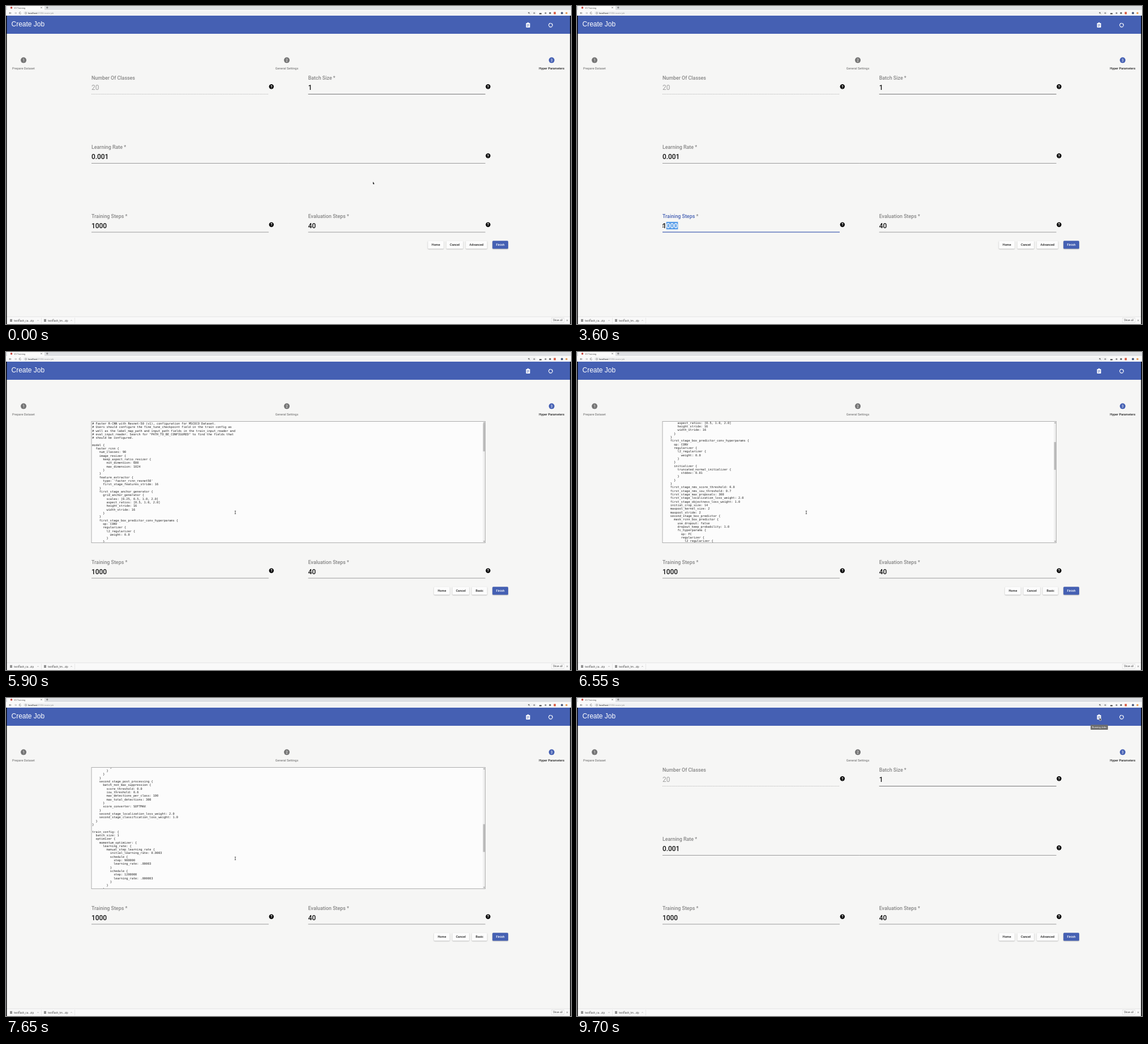
Recreate the animation shown at these times as an HTML page with a canvas. Size 998 by 561 pixels, loop 9750 ms.

```html
<!DOCTYPE html>
<html lang="en">
<head>
<meta charset="utf-8">
<title>Create Job</title>
<style>
html, body { margin: 0; width: 100%; height: 100%; overflow: hidden; background: #f6f6f5; }
canvas { display: block; }
</style>
</head>
<body>
<canvas id="stage" width="998" height="561"></canvas>
<script>
const ctx = document.getElementById('stage').getContext('2d');
const LOOP = 9750;
const BLUE = '#4560b3', PAGE = '#f6f6f5';
const ROBOTO = 'Roboto, sans-serif', ARIAL = '"Liberation Sans", sans-serif';
const MONO = '"DejaVu Sans Mono", monospace';
const LINE = 6.32;
const ADVANCED_FROM = 5350, ADVANCED_TO = 8950;

const config = `# Faster R-CNN with Resnet-50 (v1), configuration for MSCOCO Dataset.
# Users should configure the fine_tune_checkpoint field in the train config as
# well as the label_map_path and input_path fields in the train_input_reader and
# eval_input_reader. Search for "PATH_TO_BE_CONFIGURED" to find the fields that
# should be configured.

model {
  faster_rcnn {
    num_classes: 90
    image_resizer {
      keep_aspect_ratio_resizer {
        min_dimension: 600
        max_dimension: 1024
      }
    }
    feature_extractor {
      type: 'faster_rcnn_resnet50'
      first_stage_features_stride: 16
    }
    first_stage_anchor_generator {
      grid_anchor_generator {
        scales: [0.25, 0.5, 1.0, 2.0]
        aspect_ratios: [0.5, 1.0, 2.0]
        height_stride: 16
        width_stride: 16
      }
    }
    first_stage_box_predictor_conv_hyperparams {
      op: CONV
      regularizer {
        l2_regularizer {
          weight: 0.0
        }
      }
      initializer {
        truncated_normal_initializer {
          stddev: 0.01
        }
      }
    }
    first_stage_nms_score_threshold: 0.0
    first_stage_nms_iou_threshold: 0.7
    first_stage_max_proposals: 300
    first_stage_localization_loss_weight: 2.0
    first_stage_objectness_loss_weight: 1.0
    initial_crop_size: 14
    maxpool_kernel_size: 2
    maxpool_stride: 2
    second_stage_box_predictor {
      mask_rcnn_box_predictor {
        use_dropout: false
        dropout_keep_probability: 1.0
        fc_hyperparams {
          op: FC
          regularizer {
            l2_regularizer {
              weight: 0.0
            }
          }
          initializer {
            variance_scaling_initializer {
              factor: 1.0
              uniform: true
              mode: FAN_AVG
            }
          }
        }
      }
    }
    second_stage_post_processing {
      batch_non_max_suppression {
        score_threshold: 0.0
        iou_threshold: 0.6
        max_detections_per_class: 100
        max_total_detections: 300
      }
      score_converter: SOFTMAX
    }
    second_stage_localization_loss_weight: 2.0
    second_stage_classification_loss_weight: 1.0
  }
}

train_config: {
  batch_size: 1
  optimizer {
    momentum_optimizer: {
      learning_rate: {
        manual_step_learning_rate {
          initial_learning_rate: 0.0003
          schedule {
            step: 900000
            learning_rate: .00003
          }
          schedule {
            step: 1200000
            learning_rate: .000003
          }
        }
      }
      momentum_optimizer_value: 0.9
    }
    use_moving_average: false
  }
  gradient_clipping_by_norm: 10.0
  fine_tune_checkpoint: "/weights/frcnn_resnet_50/model.ckpt"
  from_detection_checkpoint: true
  # Note: The below line limits the training process to 200K steps, which we
  # empirically found to be sufficient enough to train the pets dataset. This
  # effectively bypasses the learning rate schedule (the learning rate will
  # never decay). Remove the below line to train indefinitely.
  num_steps: 200000
  data_augmentation_options {
    random_horizontal_flip {
    }
  }
}

train_input_reader: {
  tf_record_input_reader {
    input_path: "/training_dir/data/train.record"
  }
  label_map_path: "/training_dir/data/object-detection.pbtxt"
}

eval_config: {
  num_examples: 8000
  # Note: The below line limits the evaluation process to 10 evaluations.
  # Remove the below line to evaluate indefinitely.
  max_evals: 10
}

eval_input_reader: {
  tf_record_input_reader {
    input_path: "/training_dir/data/test.record"
  }
  label_map_path: "/training_dir/data/object-detection.pbtxt"
  shuffle: false
  num_readers: 1
}`.split('\n');

// Keyframes: [time, ...values]
const scrollKeys = [[5980, 0], [6550, 140], [7650, 414.6], [8250, 598.4], [8420, 650]];
const pointerKeys = [
  [0, 649, 312], [150, 649, 312], [950, 184, 158], [1500, 184, 158], [2100, 285, 250],
  [2600, 285, 250], [3150, 181, 388], [3300, 181, 388], [3600, 152, 388], [4300, 152, 388],
  [4800, 515, 403], [4980, 515, 403], [5280, 831, 422], [5400, 831, 422], [5800, 405, 283],
  [8480, 405, 283], [8880, 837, 422], [9000, 837, 422], [9500, 924, 37]
];

function sample(keys, t, ease = k => k) {
  if (t <= keys[0][0]) return keys[0].slice(1);
  for (let i = 1; i < keys.length; i++) {
    const [a, b] = [keys[i - 1], keys[i]];
    if (t < b[0]) {
      const k = ease((t - a[0]) / (b[0] - a[0]));
      return a.slice(1).map((v, j) => v + (b[j + 1] - v) * k);
    }
  }
  return keys[keys.length - 1].slice(1);
}
const smooth = k => k * k * (3 - 2 * k);

function rect(x, y, w, h, color) {
  ctx.fillStyle = color;
  ctx.fillRect(x, y, w, h);
}
function round(x, y, w, h, r, color) {
  ctx.fillStyle = color;
  ctx.beginPath();
  ctx.roundRect(x, y, w, h, r);
  ctx.fill();
}
function disc(x, y, r, color) {
  ctx.fillStyle = color;
  ctx.beginPath();
  ctx.arc(x, y, r, 0, 7);
  ctx.fill();
}
function text(str, x, y, size, color, { family = ROBOTO, weight = 400, align = 'left' } = {}) {
  ctx.font = `${weight} ${size}px ${family}`;
  ctx.textAlign = align;
  ctx.fillStyle = color;
  ctx.fillText(str, x, y);
}
function path(points, color, width = 0.7, dash = []) {
  ctx.beginPath();
  points.forEach(([x, y]) => ctx.lineTo(x, y));
  ctx.strokeStyle = color;
  ctx.lineWidth = width;
  ctx.setLineDash(dash);
  ctx.stroke();
  ctx.setLineDash([]);
}
function cross(x, y, r, color) {
  path([[x - r, y - r], [x + r, y + r]], color);
  path([[x + r, y - r], [x - r, y + r]], color);
}

function browserBars() {
  rect(0, 0, 998, 7, '#dee0e3');
  rect(2, 0, 66, 7, '#fafafa');
  disc(9.5, 3, 1.8, '#c33c35');
  text('V3 Training', 14, 4.6, 4, '#555');
  cross(62.5, 2.8, 1.1, '#555');
  path([[71, 2.8], [74.6, 2.8]], '#555');
  path([[72.8, 1], [72.8, 4.6]], '#555');

  rect(0, 7, 998, 10, '#fafafa');
  path([[9.5, 12.4], [5.8, 12.4], [7.4, 10.8]], '#555');
  path([[5.8, 12.4], [7.4, 14]], '#555');
  path([[15, 12.4], [18.6, 12.4], [17, 10.8]], '#aaa');
  path([[18.6, 12.4], [17, 14]], '#aaa');
  ctx.beginPath();
  ctx.arc(25, 12.4, 1.7, 0.4, 5.6);
  ctx.strokeStyle = '#555';
  ctx.stroke();
  round(30, 8.8, 907, 7.2, 3.6, '#f1f2f3');
  ctx.beginPath();
  ctx.arc(35, 12.5, 1.5, 0, 7);
  ctx.lineWidth = 0.5;
  ctx.stroke();
  text('localhost', 39, 13.9, 4, '#222');
  text(':3100/create-job', 55, 13.9, 4, '#999');
  disc(923.5, 12, 1.3, '#777');
  path([[924, 12.6], [925.6, 14.4]], '#777');
  disc(933, 12.5, 1.5, '#999');
  rect(942, 12.5, 4, 2, '#444');
  disc(953, 12.5, 1.6, '#888');
  disc(961, 12.5, 1.7, '#666');
  rect(967.5, 10.5, 3.6, 4, '#d8573d');
  disc(982, 12.5, 2, '#475779');
  disc(990, 12.5, 1.8, '#e49a52');
}

function header() {
  rect(0, 17, 998, 32, BLUE);
  text('Create Job', 9.5, 36.4, 12, '#fff', { family: ARIAL });
  round(918.6, 30, 7, 8, 0.8, '#fff');
  disc(922.1, 30, 1.2, '#fff');
  for (const [y, w] of [[32.2, 4], [33.9, 4], [35.6, 2.7]]) rect(920.1, y, w, 0.7, BLUE);
  ctx.strokeStyle = '#fff';
  ctx.lineWidth = 1.3;
  for (let i = 0; i < 3; i++) {
    ctx.beginPath();
    ctx.arc(962, 33.8, 3.3, i * 2.094 - 1.4, i * 2.094 + 0.5);
    ctx.stroke();
  }
}

function step(n, x, label, active) {
  disc(x, 95.6, 5, active ? BLUE : '#757575');
  text(n, x, 97.9, 6.4, '#fff', { align: 'center' });
  text(label, x, 111.6, 5.57, active ? '#222' : '#666', { align: 'center', weight: active ? 500 : 400 });
}

function help(x, y) {
  disc(x, y, 4.2, '#080808');
  text('?', x, y + 2.4, 6.6, '#fff', { align: 'center', weight: 700 });
}

function field(label, value, x, y, right, { line = '#9b9b9b', disabled, focused } = {}) {
  const star = label.endsWith(' *');
  const name = star ? label.slice(0, -2) : label;
  text(name, x, y + 3.2, 8.9, focused ? BLUE : '#858585', { weight: 500 });
  if (star) text(' *', x + ctx.measureText(name).width, y + 3.2, 8.9, '#858585', { weight: 500 });
  text(value, x, y + 21.2, 11.9, disabled ? '#a0a0a0' : '#111', { weight: disabled ? 400 : 500 });
  const lineY = y + 28.5;
  if (disabled) path([[x, lineY], [right, lineY]], '#b5b5b5', 0.9, [1.5, 1.2]);
  else if (focused) path([[x, lineY - 0.2], [right, lineY - 0.2]], BLUE, 1.3);
  else path([[x, lineY], [right, lineY]], line, 1);
  help(right + 4.8, y + 15.2);
}

function button(label, x, w, primary) {
  ctx.save();
  ctx.shadowColor = 'rgba(0,0,0,.3)';
  ctx.shadowBlur = 2;
  ctx.shadowOffsetY = 0.8;
  round(x, 414.3, w, 14, 1.5, primary ? BLUE : '#fcfcfc');
  ctx.restore();
  text(label, x + w / 2, 423.2, 5.6, primary ? '#fff' : '#222', { align: 'center', weight: 500 });
}

function selection(t) {
  if (t < 3330 || t > 4780) return;
  const digit = 6.76;
  const count = t > 3630 ? 4 : Math.min(3, 1 + Math.floor((t - 3330) / 90));
  const x = 151 + (4 - count) * digit;
  rect(x, 380.8, count * digit + 0.3, 13.2, '#559be8');
  text('0'.repeat(count).replace(/^0000$/, '1000'), x, 391.7, 11.9, '#fff', { weight: 500 });
}

function editor(t) {
  const [scroll] = sample(scrollKeys, t);
  rect(151, 122.5, 696, 214, '#fcfcfc');
  ctx.save();
  ctx.beginPath();
  ctx.rect(151, 123, 691, 213);
  ctx.clip();
  config.forEach((row, i) => {
    const y = 127.9 + i * LINE - scroll;
    if (y > 118 && y < 344) text(row, 152.2, y, 5.265, '#222', { family: MONO });
  });
  ctx.restore();
  rect(842.3, 123, 4.2, 213, '#f0f0f0');
  rect(842.6, 126.3 + scroll * 0.232, 3.6, 49, '#bdbdbd');
  for (const [y, d] of [[125, -1], [334, 1]]) {
    ctx.fillStyle = '#666';
    ctx.beginPath();
    ctx.moveTo(843.2, y - d * 0.6);
    ctx.lineTo(845.8, y - d * 0.6);
    ctx.lineTo(844.5, y + d * 0.9);
    ctx.fill();
  }
  ctx.strokeStyle = '#adadad';
  ctx.lineWidth = 1;
  ctx.strokeRect(151, 122.5, 695.5, 214);
}

function downloads() {
  rect(0, 548, 998, 13, '#f9f9f9');
  rect(0, 547.8, 998, 0.7, '#dcdcdc');
  [['testflash_ca...zip', 7], ['testflash_tm...zip', 67]].forEach(([name, x], i) => {
    rect(x, 552.6, 4, 4.2, '#777');
    rect(x, 554.4, 4, 0.6, '#ddd');
    text(name, x + 7, 556.5, 4.7, '#555');
    const c = i ? 115.5 : 56.5;
    path([[c - 1.2, 555.4], [c, 554.2], [c + 1.2, 555.4]], '#777', 0.6);
    rect(c + 5.5, 550, 0.6, 10, '#ddd');
  });
  round(963, 550.2, 23, 8.3, 1, '#ccc');
  round(963.5, 550.7, 22, 7.3, 0.8, '#fff');
  text('Show all', 974.5, 556, 4.5, '#444', { align: 'center' });
  cross(991.3, 554.6, 1.1, '#666');
}

function pointer(t) {
  const [x, y] = sample(pointerKeys, t, smooth);
  const inText = (t > 3130 && t < 4320) || (t > 5720 && t < 8520);
  if (inText) {
    path([[x - 1.2, y - 2.5], [x + 1.2, y - 2.5]], '#333', 0.7);
    path([[x, y - 2.5], [x, y + 2.5]], '#333', 0.8);
    path([[x - 1.2, y + 2.5], [x + 1.2, y + 2.5]], '#333', 0.7);
    return;
  }
  ctx.beginPath();
  for (const [dx, dy] of [[-1, -2], [-1, 2.6], [0, 1.8], [0.7, 3], [1.4, 2.6], [0.9, 1.4], [2, 1.3]])
    ctx.lineTo(x + dx, y + dy);
  ctx.closePath();
  ctx.strokeStyle = '#fff';
  ctx.lineWidth = 1;
  ctx.stroke();
  ctx.fillStyle = '#333';
  ctx.fill();
}

function draw(t) {
  const advanced = t >= ADVANCED_FROM && t < ADVANCED_TO;
  rect(0, 0, 998, 561, PAGE);
  browserBars();
  header();
  step('1', 31, 'Prepare Dataset');
  step('2', 496, 'General Settings');
  step('3', 963.8, 'Hyper Parameters', true);

  if (advanced) {
    editor(t);
  } else {
    field('Number Of Classes', '20', 151, 127, 464, { disabled: true });
    field('Batch Size *', '1', 533.7, 127, 846.7, { line: '#777' });
    field('Learning Rate *', '0.001', 151, 249, 846.7);
  }
  field('Training Steps *', '1000', 151, 370.5, 464, { focused: t >= 3300 && t < 4800 });
  field('Evaluation Steps *', '40', 533.7, 370.5, 846.7);
  selection(t);

  button('Home', advanced ? 756 : 745.3, 27.8);
  button('Cancel', advanced ? 788.4 : 777.7, 29.8);
  if (advanced) button('Basic', 822.8, 27);
  else button('Advanced', 812.1, 37.7);
  button('Finish', 859.2, 27.8, true);
  downloads();

  rect(0, 17, 1.4, 544, '#000');
  rect(996.4, 17, 1.6, 544, '#000');
  if (t >= 9550) {
    round(907.2, 47.2, 30.6, 8.8, 0.8, '#6e6e6e');
    text('Running Jobs', 922.5, 53.1, 4.2, '#fff', { align: 'center' });
  }
  pointer(t);
}

function frame(now) {
  draw(now % LOOP);
  requestAnimationFrame(frame);
}
requestAnimationFrame(frame);
</script>
</body>
</html>
```
